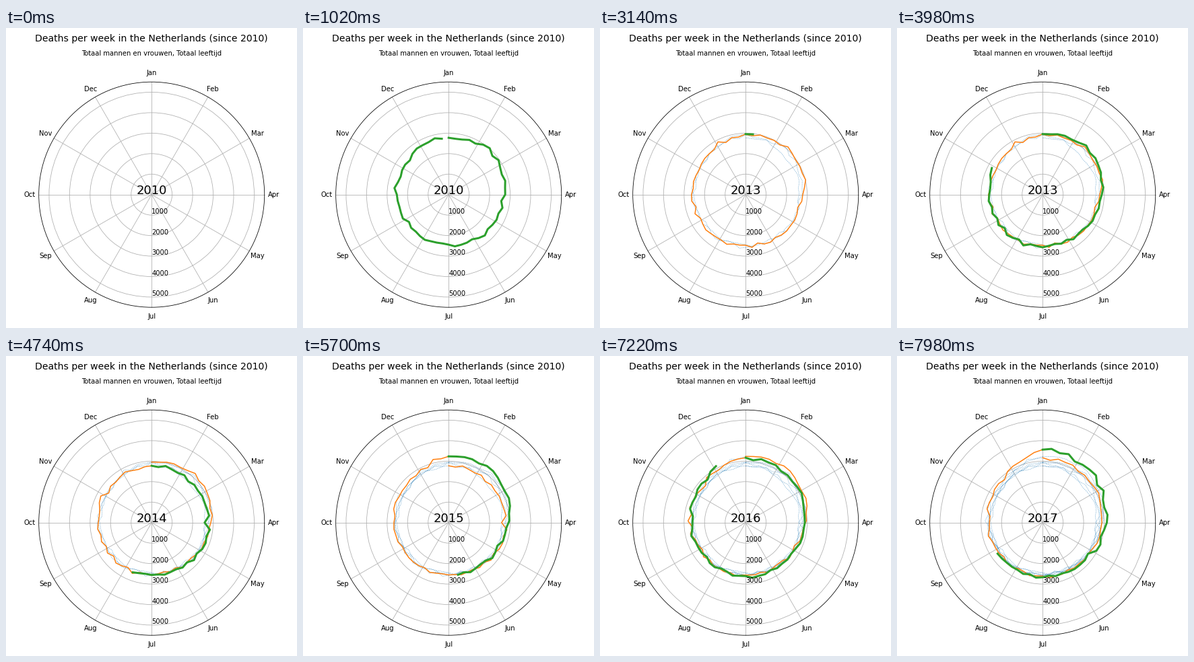
Write a matplotlib script that moves like this. It is 432 by 446 pixels and loops after 8 s.

```python
import numpy as np
import matplotlib.pyplot as plt
from matplotlib.animation import FuncAnimation
from matplotlib.patches import Circle

W, H, DPI = 432, 446, 72
CX, CY, RIM = 216.2, 247.7, 167.5
PER_1000 = RIM / 5.5
FRAMES = 400
GRID = "#b0b0b0"

# Radius at New Year and in mid-February; the rest follows the season.
WINTERS = {2010: (84.5, 87.5), 2011: (89, 81), 2012: (89.5, 93),
           2013: (90, 96), 2014: (84.5, 84), 2015: (98.5, 101),
           2016: (96.5, 95), 2017: (108.5, 105)}


def weeks_in(year):
    return 53 if year == 2015 else 52


def polar(angle, r):
    return CX + r * np.sin(angle), CY - r * np.cos(angle)


def year_curve(year):
    """Points of one year, closed on the first week of the next."""
    n = weeks_in(year)
    weeks = np.arange(n + 1)
    start, february = WINTERS[year]
    following = WINTERS.get(year + 1, WINTERS[year])[0]
    base = 74 + 0.8 * (year - 2010)
    r = np.interp(weeks, [0, 6, 18, 24, 34, 46, n],
                  [start, february, base + 5, base + 1, base + 1, base + 6,
                   following])
    r[1:-1] += np.random.default_rng(year).normal(0, 1.8, n - 1)
    return polar(2 * np.pi * weeks / n, r)


curves = {y: year_curve(y) for y in WINTERS}
timeline = [(y, w) for y in WINTERS for w in range(weeks_in(y))]

plt.rcParams["font.family"] = "DejaVu Sans"
fig = plt.figure(figsize=(W / DPI, H / DPI), dpi=DPI, facecolor="white")
ax = fig.add_axes([0, 0, 1, 1])
ax.set(xlim=(0, W), ylim=(H, 0))
ax.axis("off")


def ring(r, color, z):
    ax.add_patch(Circle((CX, CY), r, fill=False, ec=color, lw=0.8, zorder=z))


def label(x, y, s, size=10, ha="center", va="baseline"):
    return ax.text(x, y, s, fontsize=size, ha=ha, va=va, color="black", zorder=6)


months = "Jan Feb Mar Apr May Jun Jul Aug Sep Oct Nov Dec".split()
for i, name in enumerate(months):
    a = i * np.pi / 6
    x, y = polar(a, RIM)
    ax.plot([CX, x], [CY, y], color=GRID, lw=0.8, zorder=1)
    x, y = polar(a, 181.5)
    label(x, y + 0.3, name, va="center")

for k in range(1, 6):
    ring(k * PER_1000, GRID, 1)
    label(CX, CY + k * PER_1000, f"{k * 1000}", ha="left", va="bottom")
ring(RIM, "black", 5)

label(216, 20, "Deaths per week in the Netherlands (since 2010)", 14)
label(216, 41, "Totaal mannen en vrouwen, Totaal leeftijd")
year_text = label(CX, CY - 1, "2010", 18)

lines = {y: ax.plot([], [])[0] for y in WINTERS}


def draw(frame):
    now, week = timeline[frame]
    year_text.set_text(str(now))
    for y, line in lines.items():
        line.set_visible(y <= now)
        xs, ys = curves[y]
        if y == now:
            line.set(color="C2", lw=3, ls="-", alpha=1, zorder=4)
            line.set_data(xs[:week + 1], ys[:week + 1])
        else:
            line.set_data(xs, ys)
            if y == now - 1:
                line.set(color="C1", lw=1.5, ls="-", alpha=1, zorder=3)
            else:
                line.set(color="C0", lw=0.5, ls="--", alpha=0.7, zorder=2)
    return [year_text, *lines.values()]


anim = FuncAnimation(fig, draw, frames=FRAMES, interval=20, repeat=True,
                     repeat_delay=0, init_func=lambda: draw(0))
plt.show()
```
